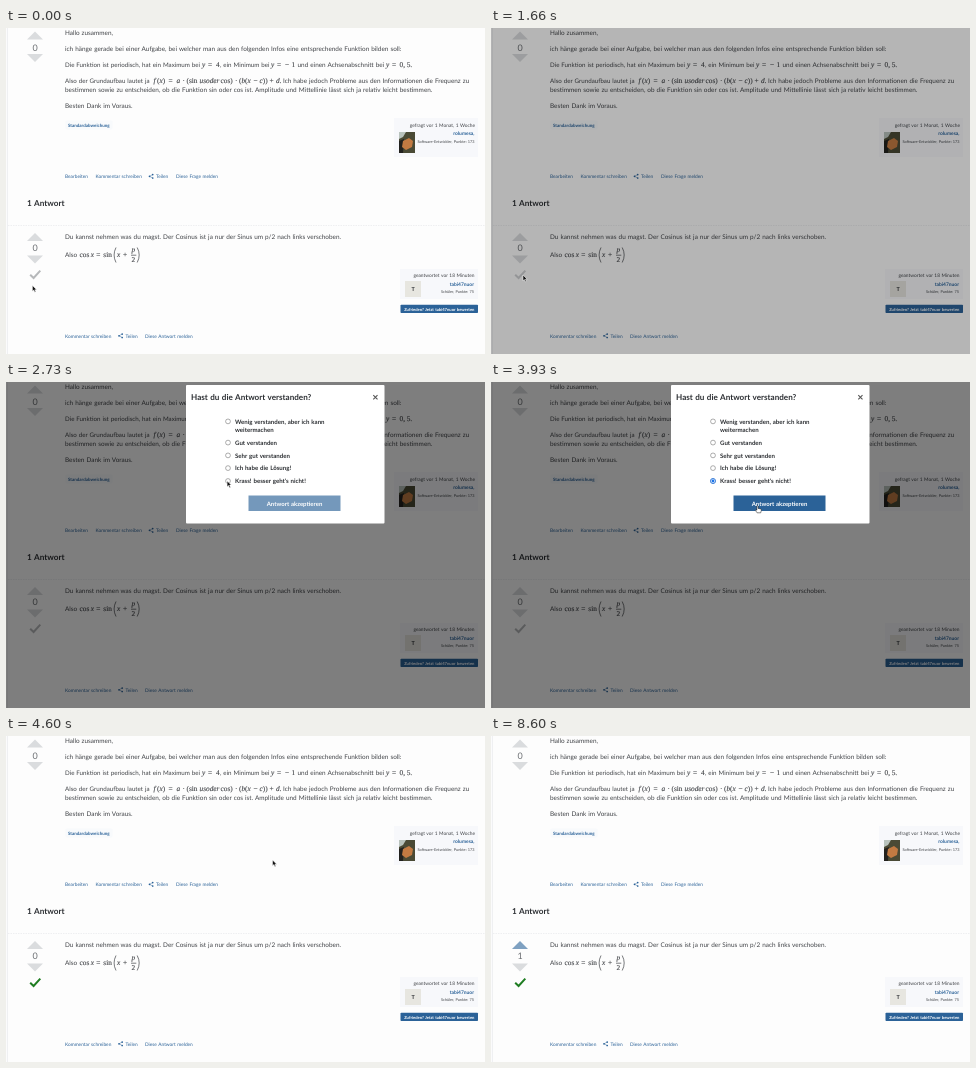
These frames come from a looping animation (479 px wide and 326 px high, 9000 ms). An HTML page:

```html
<!DOCTYPE html>
<html lang="de">
<head>
<meta charset="utf-8">
<title>Antwort akzeptieren</title>
<style>
  html, body { margin: 0; width: 100%; height: 100%; overflow: hidden; background: #fdfdfd; }
  svg { display: block; width: 100%; height: 100%; }
  text { font: 6.4px Lato, sans-serif; word-spacing: .06em; fill: #404347; text-rendering: geometricPrecision; white-space: pre; }
  .tight { font-size: 6.2px; }
  .math { font: italic 7.3px "Liberation Serif", serif; word-spacing: 0; stroke: #404347; stroke-width: .12; }
  .up { font-style: normal; }
  .link { font-size: 4.8px; fill: #2b6298; }
  .meta { font-size: 4.85px; text-anchor: end; }
  .name { font-size: 4.95px; font-weight: 700; text-anchor: end; fill: #2b6298; }
  .points { font-size: 3.85px; text-anchor: end; }
  .tag { font-size: 4.48px; font-weight: 700; fill: #2b6298; }
  .votes { font-size: 9px; text-anchor: middle; fill: #6c6f73; }
  .bold { font-weight: 700; fill: #2c2f33; }
  .white { fill: #fff; font-weight: 700; text-anchor: middle; }
  .card { fill: #f7f8fb; }
  .arrow { fill: #dadcde; }
  .blue { fill: #2b6298; }
  .rule { stroke: #e9eaec; stroke-width: .7; fill: none; }
</style>
</head>
<body>
<svg viewBox="0 0 479 326" preserveAspectRatio="none">
  <defs>
    <g id="share" fill="#2b6298">
      <path d="M4.2 -3.4L1 -1.7L4.2 0" fill="none" stroke="#2b6298" stroke-width=".45"/>
      <circle cx="4.2" cy="-3.4" r=".85"/><circle cx="1" cy="-1.7" r=".85"/><circle cx="4.2" cy="0" r=".85"/>
    </g>
    <path id="triangle" d="M-8 4L0 -4L8 4Z"/>
  </defs>

  <path class="rule" d="M1.4 0V326"/>
  <path class="rule" d="M2 197.5H479" stroke-dasharray="1.5 1"/>

  <!-- Question -->
  <use href="#triangle" class="arrow" x="29" y="7.5"/>
  <text class="votes" x="29" y="22.5">0</text>
  <use href="#triangle" class="arrow" transform="translate(29 30) scale(1 -1)"/>

  <text x="59" y="6.5">Hallo zusammen,</text>
  <text x="59" y="22.5">ich hänge gerade bei einer Aufgabe, bei welcher man aus den folgenden Infos eine entsprechende Funktion bilden soll:</text>
  <text class="tight" x="59" y="38.5">Die Funktion ist periodisch, hat ein Maximum bei</text>
  <text class="math" x="196" y="38.5">y <tspan class="up" x="202">=</tspan><tspan class="up" x="210">4</tspan></text>
  <text class="tight" x="214" y="38.5">, ein Minimum bei</text>
  <text class="math" x="265" y="38.5">y <tspan class="up" x="271">=</tspan><tspan class="up" x="279">−</tspan><tspan class="up" x="285.5">1</tspan></text>
  <text x="291.5" y="38.5">und einen Achsenabschnitt bei</text>
  <text class="math" x="380" y="38.5">y <tspan class="up" x="386">=</tspan><tspan class="up" x="393.5">0, 5</tspan>.</text>
  <text class="tight" x="59" y="54.5">Also der Grundaufbau lautet ja</text>
  <text class="math" x="147.5" y="54.5">f<tspan class="up" x="151">(</tspan>x<tspan class="up">)</tspan><tspan class="up" x="162.5">=</tspan><tspan x="170.5">a</tspan><tspan class="up" x="176.5">·</tspan><tspan class="up" x="180.5">(sin</tspan><tspan x="193.5">usoder</tspan><tspan class="up" x="214.5">cos)</tspan><tspan class="up" x="229">·</tspan><tspan class="up" x="233">(</tspan>b<tspan class="up">(</tspan>x<tspan class="up" x="247.5">−</tspan><tspan x="253.5">c</tspan><tspan class="up">))</tspan><tspan class="up" x="263.5">+</tspan><tspan x="270">d</tspan>.</text>
  <text x="277" y="54.5">Ich habe jedoch Probleme aus den Informationen die Frequenz zu</text>
  <text x="59" y="64">bestimmen sowie zu entscheiden, ob die Funktion sin oder cos ist. Amplitude und Mittellinie lässt sich ja relativ leicht bestimmen.</text>
  <text x="59" y="80">Besten Dank im Voraus.</text>

  <rect x="59.5" y="92.5" width="47" height="9" rx="1" fill="#f8fafc"/>
  <text class="tag" x="62" y="98.6">Standardabweichung</text>

  <rect class="card" x="388" y="90" width="84" height="39"/>
  <text class="meta" x="469" y="98.8">gefragt vor 1 Monat, 1 Woche</text>
  <text class="name" x="468.5" y="107.3">rolumesa,</text>
  <text class="points" x="468.5" y="114.5">Software-Entwickler, Punkte: 173</text>
  <rect x="393" y="104" width="16" height="21" fill="#4a4a35"/>
  <path d="M393 104H400L397 109L393 111Z" fill="#b9c3bd"/>
  <path d="M393 113L398 111L397 125H393Z" fill="#22211e"/>
  <path d="M397 113L403 110L407 113L406 119L400 122L396 119Z" fill="#c27a42"/>

  <text class="link" x="59" y="150">Bearbeiten</text>
  <text class="link" x="89.5" y="150">Kommentar schreiben</text>
  <use href="#share" x="142.5" y="150"/>
  <text class="link" x="150" y="150">Teilen</text>
  <text class="link" x="170" y="150">Diese Frage melden</text>

  <text class="bold" x="21" y="178" style="font-size:8.2px">1 Antwort</text>

  <!-- Answer -->
  <use href="#triangle" id="upvote" class="arrow" x="29" y="209"/>
  <text class="votes" id="votes" x="29" y="223.3">0</text>
  <use href="#triangle" class="arrow" transform="translate(29 231.5) scale(1 -1)"/>
  <path id="check" d="M24.2 246.7L27.6 250L34.3 242.6" fill="none" stroke-width="2"/>

  <text x="59" y="211">Du kannst nehmen was du magst. Der Cosinus ist ja nur der Sinus um p/2 nach links verschoben.</text>
  <text x="59" y="229">Also</text>
  <text class="math" y="229"><tspan class="up" x="73.5">cos</tspan><tspan x="84.8">x</tspan><tspan class="up" x="90.3">=</tspan><tspan class="up" x="97.3">sin</tspan><tspan x="111">x</tspan><tspan class="up" x="117">+</tspan><tspan x="125.5" y="224.3">p</tspan><tspan class="up" x="125.5" y="234">2</tspan></text>
  <path d="M125 227.2H130.3M110 219.5Q106.2 227 110 234.5M131.2 219.5Q135.2 227 131.2 234.5" fill="none" stroke="#404347" stroke-width=".7"/>

  <rect class="card" x="394" y="241" width="78" height="30"/>
  <text class="meta" x="468.5" y="249">geantwortet vor 18 Minuten</text>
  <text class="name" x="468" y="258">tabi47nuor</text>
  <text class="points" x="468" y="265.3">Schüler, Punkte: 75</text>
  <rect x="399" y="253" width="16" height="16" fill="#e7e6e0"/>
  <text class="bold" x="407" y="262.8" text-anchor="middle" style="font-size:5.4px">T</text>
  <rect class="blue" x="394.5" y="276.8" width="77.5" height="8.2" rx=".8"/>
  <text class="white" x="433.3" y="282.5" style="font-size:4.15px">Zufrieden? Jetzt tabi47nuor bewerten</text>

  <text class="link" x="59" y="309.5">Kommentar schreiben</text>
  <use href="#share" x="112" y="309.5"/>
  <text class="link" x="119.5" y="309.5">Teilen</text>
  <text class="link" x="139" y="309.5">Diese Antwort melden</text>

  <!-- Dialog -->
  <rect id="backdrop" width="479" height="326"/>
  <g id="modal">
    <rect x="180" y="3" width="198.5" height="138.5" rx="1" fill="#fff"/>
    <text class="bold" x="185" y="17.6" style="font-size:8.1px">Hast du die Antwort verstanden?</text>
    <path d="M367.3 13.2L371.5 17.4M371.5 13.2L367.3 17.4" stroke="#555" stroke-width="1.1"/>
    <g id="options"></g>
    <g id="accept">
      <rect class="blue" x="242.5" y="113.5" width="92" height="15.5"/>
      <text class="white" x="288.5" y="123.6" style="font-size:6px">Antwort akzeptieren</text>
    </g>
  </g>

  <g id="cursor" stroke="#fff" stroke-width=".5" stroke-linejoin="round">
    <path id="pointer" d="M0 0V5.8L1.4 4.6L2.4 6.8L3.4 6.3L2.4 4.2H4.2Z" fill="#111"/>
    <path id="hand" d="M-.6 0Q0 -.8 .6 0V2.4L3.4 3Q4 3.4 3.8 4.6L3.2 6.8H-.4L-2.2 4.2Q-2 3.2 -.6 4.2Z" fill="#fff" stroke="#111"/>
  </g>
</svg>

<script>
const LOOP = 9000;
const $ = id => document.getElementById(id);

const options = [
  [41.6, 'Wenig verstanden, aber ich kann'],
  [62.8, 'Gut verstanden'],
  [75.6, 'Sehr gut verstanden'],
  [88.3, 'Ich habe die Lösung!'],
  [101.2, "Krass! besser geht's nicht!"]
];
const label = (y, text) => `<text class="bold" x="229" y="${y}" style="font-size:6.1px">${text}</text>`;
const radio = y => `<circle cx="222" cy="${y - 2.2}" r="2.4" fill="#fff" stroke="#777" stroke-width=".6"/>`;
$('options').innerHTML = options.map(([y, text]) => radio(y) + label(y, text)).join('')
  + label(50.2, 'weitermachen')
  + '<g id="chosen"><circle cx="222" cy="99" r="2.7" fill="#1a73e8"/><circle cx="222" cy="99" r="2" fill="#fff"/><circle cx="222" cy="99" r="1.4" fill="#1a73e8"/></g>';

// Cursor stops: time, x, y
const path = [
  [0, 26.4, 257.5], [700, 26.4, 257.5], [1250, 32, 247], [1680, 32, 247],
  [1860, 131, 186], [2300, 205, 115], [2800, 222, 98], [3200, 222, 98],
  [3700, 266.5, 124], [5750, 266.5, 124], [6400, 204.2, 101], [7050, 29, 209],
  [7550, 29, 209], [8400, 109, 72], [8600, 118, -10]
];

const clamp = v => Math.min(1, Math.max(0, v));
const progress = (t, start, duration) => clamp((t - start) / duration);
const smooth = p => p * p * (3 - 2 * p);
const easeOut = p => 1 - (1 - p) ** 1.8;
const between = (t, start, end) => t >= start && t < end;
const show = (id, visible) => $(id).style.display = visible ? '' : 'none';

function cursorAt(t) {
  const i = path.findIndex(stop => stop[0] > t);
  if (i < 0) return path.at(-1).slice(1);
  const [t0, x0, y0] = path[i - 1], [t1, x1, y1] = path[i];
  const p = smooth((t - t0) / (t1 - t0));
  return [x0 + (x1 - x0) * p, y0 + (y1 - y0) * p];
}

function draw(t) {
  const [x, y] = cursorAt(t);
  $('cursor').setAttribute('transform', `translate(${x} ${y})`);
  const onButton = between(t, 3550, 4300);
  show('pointer', !onButton);
  show('hand', onButton);

  const dim = progress(t, 1575, 150) - progress(t, 4430, 150);
  $('backdrop').style.opacity = dim * 0.5;

  const slide = easeOut(progress(t, 1740, 300)) - easeOut(progress(t, 4150, 300));
  $('modal').setAttribute('transform', `translate(0 ${-34.5 * (1 - slide)})`);
  $('modal').style.opacity = progress(t, 1740, 150) - progress(t, 4150, 150);

  const chosen = t >= 3000;
  show('chosen', chosen);
  $('accept').style.opacity = chosen ? 1 : 0.65;

  const hover = between(t, 1150, 1740);
  $('check').style.stroke = t >= 4250 ? '#1f7d22' : hover ? '#cfd1d3' : '#b6b8ba';

  const voted = t >= 7350;
  $('upvote').style.fill = voted ? '#7fa1c1' : '';
  $('votes').textContent = voted ? '1' : '0';
}

function frame() {
  draw(performance.now() % LOOP);
  requestAnimationFrame(frame);
}
frame();
</script>
</body>
</html>
```
